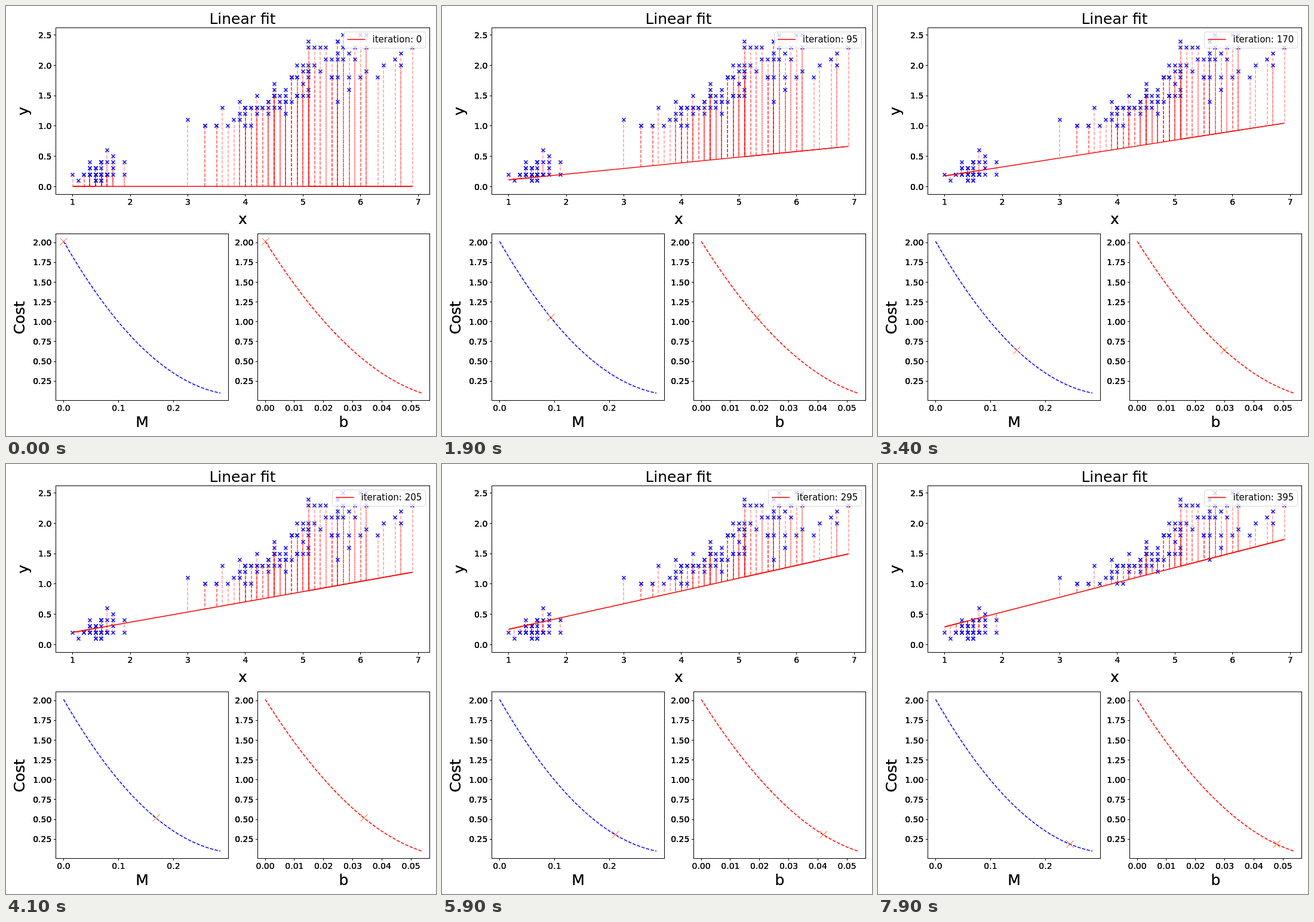
Recreate the animation shown at these times as an HTML page with a canvas. Size 720 by 720 pixels, loop 8000 ms.

```html
<!DOCTYPE html>
<html lang="en">
<head>
<meta charset="utf-8">
<title>Linear fit</title>
<style>
  html, body { margin: 0; width: 100%; height: 100%; overflow: hidden; background: #fff; }
  canvas { display: block; width: 720px; height: 720px; }
</style>
</head>
<body>
<canvas id="stage" width="720" height="720"></canvas>
<script>
const ctx = document.getElementById('stage').getContext('2d');
const FONT = '"DejaVu Sans", Verdana, sans-serif';
const DASH = [5.55, 2.4];
const STEPS = 600, RATE = 1e-4;
const LOOP = 8000, FRAME = 100, STEPS_PER_FRAME = 5;

const run = (a, b) => Array.from({ length: b - a + 1 }, (_, i) => a + i);

// y -> x values, both in tenths; [x, n] is a point that occurs n times
const rows = {
  1: [11, [14, 2], [15, 2]],
  2: [10, [12, 2], [13, 4], [14, 8], [15, 7], [16, 5], 17, 19],
  3: [[13, 2], [14, 3], 15, 17],
  4: [13, [15, 3], 16, 17, 19],
  5: [17],
  6: [16],
  10: [[33, 2], [35, 2], 37, 40, 41],
  11: [30, 38, 39],
  12: [39, 40, 42, 44, 47],
  13: [36, ...run(40, 46), 40, ...run(40, 43)],
  14: [39, [44, 2], 46, [47, 2], 48, 56],
  15: [42, [45, 5], 46, 47, [49, 2], 50, 51],
  16: [45, 47, 51, 58],
  17: [45, 50],
  18: [[48, 3], [49, 2], 51, [55, 2], 56, 58, 60, 63],
  19: [50, [51, 2], 53, 61],
  20: [...run(49, 52), 64, 67],
  21: [...run(54, 57), 59, 66],
  22: [56, 58, 67],
  23: [...run(51, 54), 57, 59, 61, 69],
  24: [51, [56, 2]],
  25: [57, 60, 61]
};
const points = Object.entries(rows).flatMap(([y, xs]) =>
  xs.flatMap(e => {
    const [x, n] = [e, 1].flat();
    return Array.from({ length: n }, () => ({ x: x / 10, y: y / 10 }));
  }));

// Gradient descent on the mean squared error
const mean = f => points.reduce((s, p) => s + f(p), 0) / points.length;
const history = [];
for (let i = 0, m = 0, b = 0; i <= STEPS; i++) {
  const err = p => m * p.x + b - p.y;
  history.push({ m, b, cost: mean(p => err(p) ** 2) });
  const gm = 2 * mean(p => err(p) * p.x), gb = 2 * mean(err);
  m -= RATE * gm;
  b -= RATE * gb;
}

const fit = { l: 83, r: 709, t: 36, b: 315, X: v => 83.1 + (v - 0.705) * 96.45, Y: v => 302.4 - v * 101.4 };
const costY = v => 396.1 + (2 - v) * 132.6;
const slope = { l: 83, r: 372, t: 381, b: 660, X: v => 96.4 + v * 920, Y: costY };
const bias = { l: 421, r: 709, t: 381, b: 660, X: v => 434.1 + v * 4880, Y: costY };

const crisp = v => Math.floor(v) + 0.5;

function stroke(color, width, pts, dash = []) {
  ctx.strokeStyle = color;
  ctx.lineWidth = width;
  ctx.setLineDash(dash);
  ctx.beginPath();
  pts.forEach(([x, y]) => ctx.lineTo(x, y));
  ctx.stroke();
  ctx.setLineDash([]);
}

function text(str, x, y, size, align = 'center', passes = 1, turn = 0) {
  ctx.save();
  ctx.translate(x, y);
  ctx.rotate(turn);
  ctx.font = `${size}px ${FONT}`;
  ctx.textAlign = align;
  ctx.fillStyle = '#000';
  for (let i = 0; i < passes; i++) ctx.fillText(str, 0, 0);
  ctx.restore();
}

function cross(x, y, r, color, width) {
  stroke(color, width, [[x - r, y - r], [x + r, y + r]]);
  stroke(color, width, [[x - r, y + r], [x + r, y - r]]);
}

function axes(a, xs, xDigits, ys, yDigits) {
  ctx.strokeStyle = '#000';
  ctx.lineWidth = 1;
  ctx.strokeRect(a.l + 0.5, a.t + 0.5, a.r - a.l, a.b - a.t);
  for (const v of xs) {
    const x = crisp(a.X(v));
    stroke('#000', 1, [[x, a.b + 0.5], [x, a.b + 4]]);
    text(v.toFixed(xDigits), a.X(v), a.b + 18, 14, 'center', 2);
  }
  for (const v of ys) {
    const y = crisp(a.Y(v));
    stroke('#000', 1, [[a.l + 0.5, y], [a.l - 3, y]]);
    text(v.toFixed(yDigits), a.l - 6.7, a.Y(v) + 5.1, 14, 'right', 3);
  }
}

function drawFit(k) {
  const { m, b } = history[k];
  const at = x => [fit.X(x), k ? fit.Y(m * x + b) : 302];
  for (const p of points) {
    const x = Math.round(fit.X(p.x));
    stroke('rgba(255,0,0,.4)', 1.5, [[x, Math.round(fit.Y(p.y))], [x, at(p.x)[1]]], DASH);
  }
  for (const p of points) cross(crisp(fit.X(p.x)), crisp(fit.Y(p.y)), 3, '#00f', 1.5);
  // The line doubles back at both ends, which thickens it there
  for (const [from, to] of [[1, 6.9], [1, 1.4], [5.1, 6.9]]) {
    stroke('#f00', 1.5, [at(from), at(to)]);
  }
}

function drawCost(a, key, color, k) {
  stroke(color, 1.5, history.map(h => [a.X(h[key]), a.Y(h.cost)]), DASH);
  const h = history[k];
  cross(crisp(a.X(h[key])), crisp(a.Y(h.cost)), 6, '#ff4500', 1);
}

function drawLegend(k) {
  const label = `iteration: ${k}`;
  ctx.font = `15px ${FONT}`;
  const textX = 696.3 - ctx.measureText(label).width;
  const left = crisp(textX - 48);
  ctx.beginPath();
  ctx.roundRect(left, 43.5, 702.5 - left, 27, 3);
  ctx.fillStyle = 'rgba(255,255,255,.8)';
  ctx.fill();
  ctx.strokeStyle = 'rgba(204,204,204,.8)';
  ctx.lineWidth = 1;
  ctx.stroke();
  stroke('#f00', 1.5, [[textX - 42, 56], [textX - 12, 56]]);
  text(label, textX, 61, 15, 'left');
}

function draw(k) {
  ctx.fillStyle = '#fff';
  ctx.fillRect(0, 0, 720, 720);

  drawFit(k);
  drawCost(slope, 'm', '#00f', k);
  drawCost(bias, 'b', '#f00', k);

  const costs = run(1, 8).map(i => i / 4);
  axes(fit, run(1, 7), 0, run(0, 5).map(i => i / 2), 1);
  axes(slope, run(0, 2).map(i => i / 10), 1, costs, 2);
  axes(bias, run(0, 5).map(i => i / 100), 2, costs, 2);

  text('Linear fit', 396, 30, 25);
  text('x', 396.5, 365, 25, 'center', 2);
  text('M', 228, 704.5, 25, 'center', 2);
  text('b', 565.5, 704.5, 25, 'center', 2);
  text('y', 37, 176, 25, 'center', 2, -Math.PI / 2);
  text('Cost', 30.5, 522, 25, 'center', 2, -Math.PI / 2);
  drawLegend(k);
}

const start = performance.now();
let shown = -1;
function tick() {
  const t = Math.max(0, performance.now() - start) % LOOP;
  const k = Math.floor(t / FRAME) * STEPS_PER_FRAME;
  if (k !== shown) draw(shown = k);
  requestAnimationFrame(tick);
}
tick();
</script>
</body>
</html>
```
